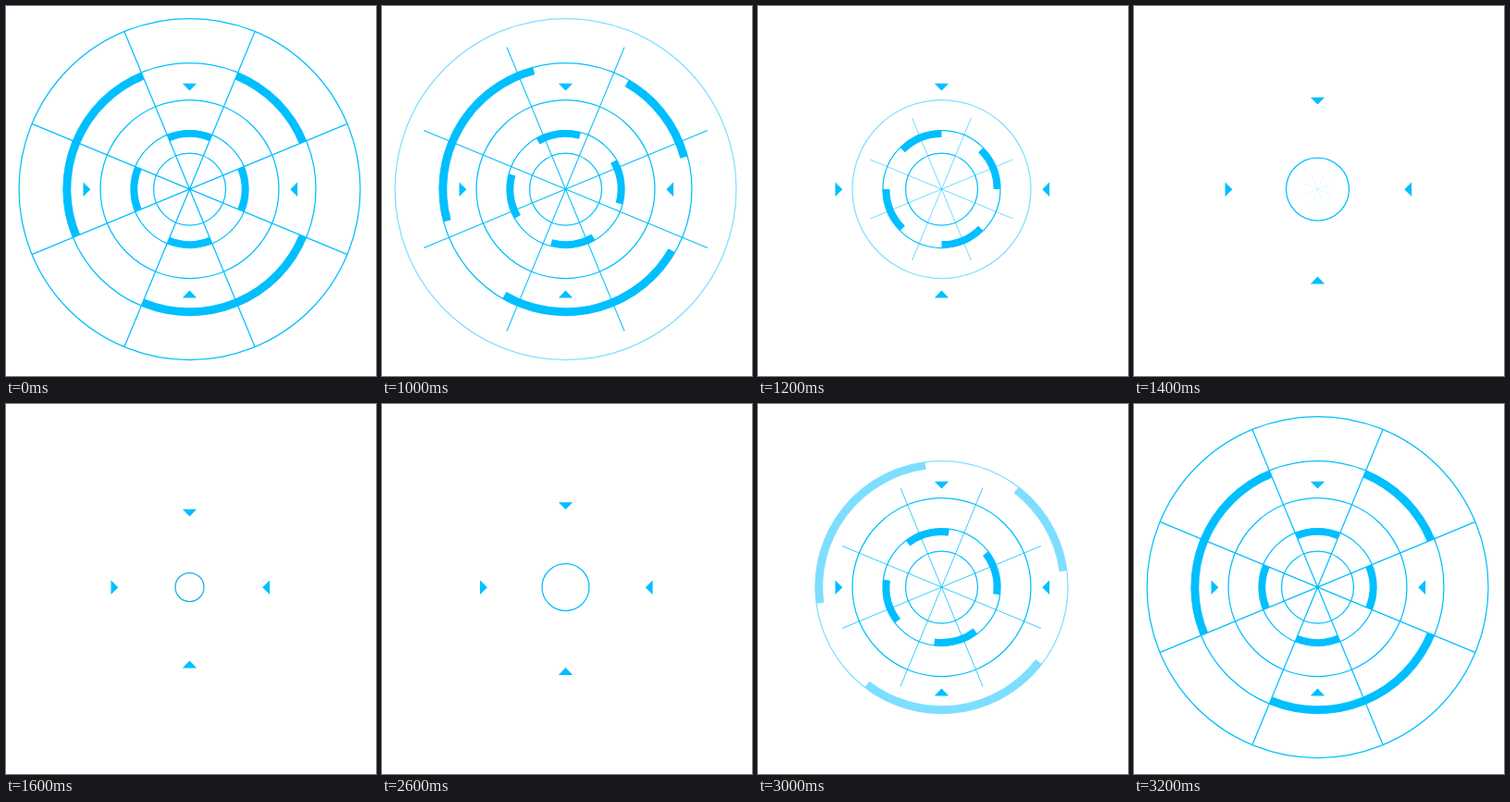
Recreate the animation shown at these times as an HTML page. Size 400 px wide and 400 px high, loop 3.3 s.

```html
<!DOCTYPE html>
<html lang="en">
<head>
<meta charset="utf-8">
<title>Radar dial</title>
<style>
  html, body { margin: 0; width: 100%; height: 100%; overflow: hidden; background: #fff; }
  svg { display: block; width: 100%; height: 100%; }
  .stroke { fill: none; stroke: #00bfff; stroke-width: 1.25; }
  .marks { fill: #00bfff; }
</style>
</head>
<body>
<svg viewBox="0 0 400 400">
  <g class="stroke" transform="translate(198.5 198)">
    <circle id="ring1" r="184.5"/>
    <g id="ring2">
      <circle r="136.5"/>
      <path id="outerArcs" stroke-width="8.5" style="stroke-width:8.5"/>
    </g>
    <circle id="ring3" r="96.5"/>
    <g id="ring4">
      <circle r="63.5"/>
      <path id="innerArcs" style="stroke-width:7.5"/>
    </g>
    <path id="spokes"/>
    <circle id="core" r="39"/>
  </g>
  <g class="marks" id="marks"></g>
</svg>
<script>
  const $ = id => document.getElementById(id);
  const LOOP = 3300, SPOKE = 184.5;
  const spokeLength = [184.5, 166, 116.3, 83.4, 50, 17, 0, 0];
  const coreRadius = [39, 39, 39, 39, 39, 34, 25.5, 15.5];

  const polar = (r, deg) => {
    const a = deg * Math.PI / 180;
    return (r * Math.cos(a)).toFixed(3) + ' ' + (r * Math.sin(a)).toFixed(3);
  };
  const arc = (r, from, to) => `M${polar(r, from)}A${r} ${r} 0 0 1 ${polar(r, to)}`;

  $('outerArcs').setAttribute('d',
    arc(132.5, 157.5, 247.5) + arc(132.5, 292.5, 337.5) + arc(132.5, 22.5, 112.5));
  $('innerArcs').setAttribute('d',
    [0, 90, 180, 270].map(a => arc(59.8, a - 22.5, a + 22.5)).join(''));
  $('spokes').setAttribute('d',
    [22.5, 67.5, 112.5, 157.5].map(a => `M${polar(SPOKE, a)}L${polar(SPOKE, a + 180)}`).join(''));

  // Triangles pointing at the centre from left, right, top and bottom
  const directions = [[-1, 0], [1, 0], [0, -1], [0, 1]];
  const marks = directions.map(() => {
    const p = document.createElementNS('http://www.w3.org/2000/svg', 'path');
    return $('marks').appendChild(p);
  });

  function drawMarks(dist) {
    directions.forEach(([dx, dy], i) => {
      const x = dx ? 199.3 + dx * dist : 198.5;
      const y = dy ? 199.6 + dy * dist : 198.2;
      const wx = dy * 7.7, wy = dx * 7.7;
      marks[i].setAttribute('d',
        `M${x - wx} ${y - wy}L${x + wx} ${y + wy}L${x - dx * 7.8} ${y - dy * 7.8}Z`);
    });
  }

  // Step 0 is fully open, step 7 fully closed
  function stepAt(t) {
    const tick = Math.floor(t / 100);
    if (tick < 10) return 0;
    if (tick < 16) return tick - 9;
    if (tick < 26) return 7;
    return 32 - tick;
  }

  function render(s) {
    for (let i = 1; i <= 4; i++) {
      $('ring' + i).setAttribute('opacity', s < i ? 1 : s === i ? 0.5 : 0);
    }
    $('outerArcs').setAttribute('transform', `rotate(${7.5 * s})`);
    $('innerArcs').setAttribute('transform', `rotate(${-7.5 * s})`);

    const len = spokeLength[s];
    $('spokes').setAttribute('visibility', len ? 'visible' : 'hidden');
    $('spokes').setAttribute('transform', `scale(${(len || 1) / SPOKE})`);

    $('core').setAttribute('r', coreRadius[s]);
    $('core').style.stroke = s === 7 ? '#14b0e6' : '';
    drawMarks(115.8 - 7.5 * Math.max(0, s - 3));
  }

  const start = performance.now();
  let shown = -1;
  function frame() {
    const s = stepAt((performance.now() - start) % LOOP);
    if (s !== shown) render(shown = s);
    requestAnimationFrame(frame);
  }
  frame();
</script>
</body>
</html>
```
